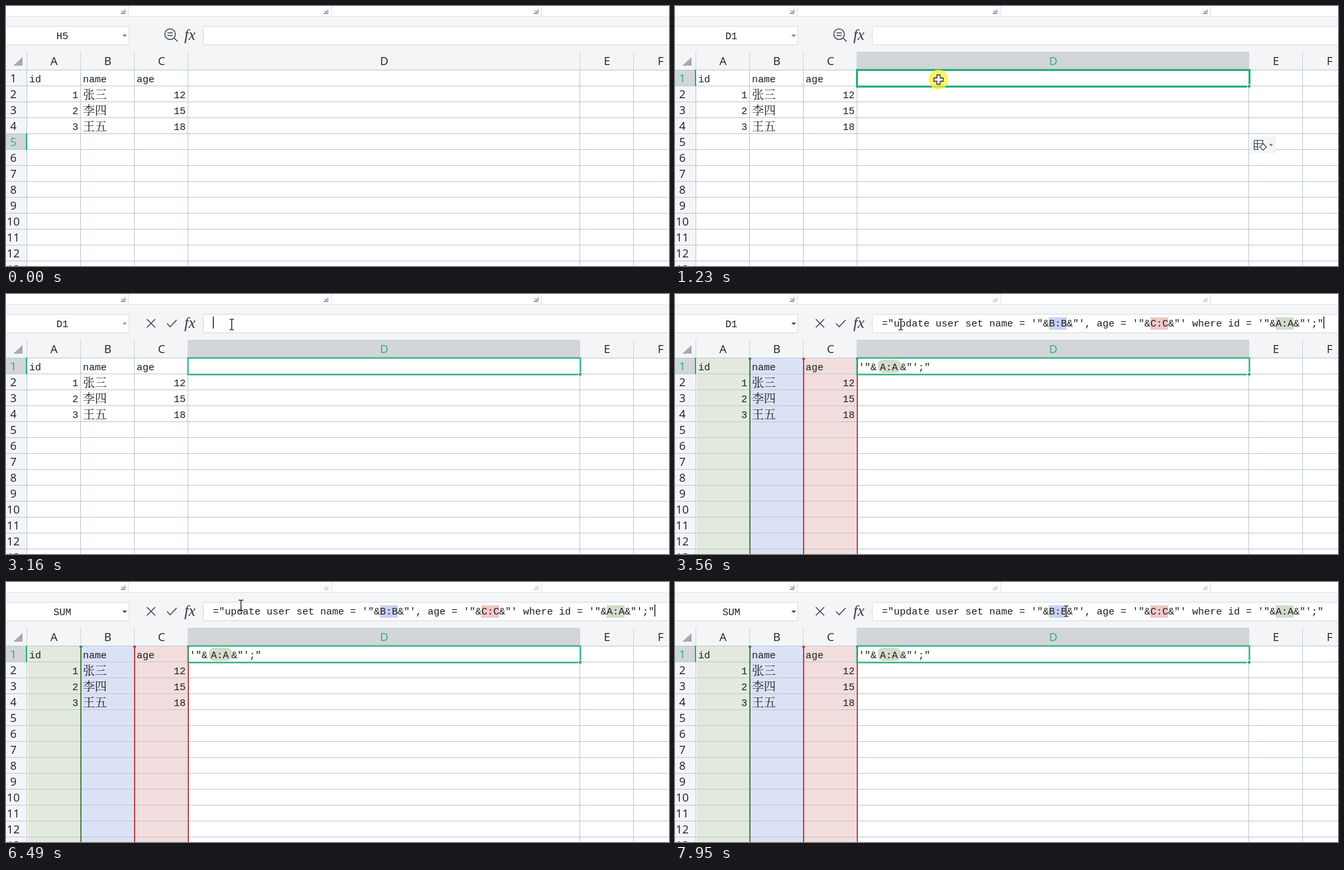
These frames come from a looping animation (1000x392 px, 8000 ms). An HTML page:

```html
<!DOCTYPE html>
<html lang="zh">
<head>
<meta charset="utf-8">
<title>Spreadsheet formula</title>
<style>
html, body { margin: 0; width: 100%; height: 100%; overflow: hidden; background: #fff; }
svg { display: block; width: 100vw; height: 100vh; }
text { white-space: pre; }
.mono { font: 15px "Liberation Mono", "Noto Serif CJK SC", "Noto Sans CJK SC", "Noto Sans CJK JP", "Noto Sans CJK", monospace; fill: #1c1c1c; }
.head { font: 17px "Open Sans", "Noto Sans", sans-serif; fill: #1c1c1c; text-anchor: middle; }
.end { text-anchor: end; }
.mid { text-anchor: middle; }
.icon { fill: none; stroke: #454a50; stroke-width: 1.5; }
</style>
</head>
<body>
<svg id="stage" viewBox="0 0 1000 392" preserveAspectRatio="none"></svg>
<script>
const LOOP = 8000, GREEN = '#22b078', GRID = '#bcc7da', ROW = 24, TOP = 96;
const COLS = [31, 112, 193, 274, 865, 946, 1027];
const stage = document.getElementById('stage');

const rect = (x, y, w, h, fill, more = '') =>
  `<rect x="${x}" y="${y}" width="${w}" height="${h}" fill="${fill}" ${more}/>`;
const text = (x, y, s, cls = 'mono', more = '') => `<text x="${x}" y="${y}" class="${cls}" ${more}>${s}</text>`;
const group = (id, body) => `<g id="${id}">${body}</g>`;
const rowTop = r => TOP + (r - 1) * ROW;

function ribbon() {
  const corner = (x, id) =>
    `<path id="${id}" d="M${x - 3} 11.5H${x + 3.5}V5M${x - 2} 6.5l3.5 3.5M${x + 1.5} 7v3h-3" fill="none" stroke="#777c84"/>`;
  return rect(0, 0, 1000, 392, '#f4f5f7') + rect(0, 0, 1000, 15, '#fff') + rect(0, 15, 1000, 1, '#e2e4e8') +
    [184, 491, 807].map(x => rect(x, 0, 1, 15, '#dfe1e5')).join('') +
    corner(176, 'c0') + corner(482, 'c1') + corner(799, 'c2');
}

function formulaBar() {
  const box = 'rx="2" stroke="#d8dade"';
  const search = '<circle cx="247.5" cy="42.5" r="8"/><path d="M253.5 48.5l5.5 5M243.5 40.5h8M243.5 44.5h8"/>';
  return rect(-4.5, 30.5, 190, 28, '#fff', box) + rect(297.5, 30.5, 720, 28, '#fff', box) +
    text(85, 50, '', 'mono mid', 'id="cellName"') +
    '<path id="drop" d="M175.5 43h7l-3.5 4z"/>' +
    `<g id="search" class="icon">${search}</g>` +
    '<path id="confirm" class="icon" d="M212.5 38l12.5 12.5M225 38l-12.5 12.5M243 44.5l4.5 5 10-10.5"/>' +
    text(269, 51, 'fx', '', 'font-family="Liberation Serif, serif" font-style="italic" font-size="23" fill="#33373c"');
}

function headers() {
  let out = rect(0, 69, 1000, 27, '#f4f5f7') + '<path d="M25 77v13H11z" fill="#a6a9af"/>' +
    rect(0, 0, 32, 24, '#d2d5da', 'id="rowMark"') + rect(275, 69, 591, 27, '#d2d5da', 'id="colMark"');
  for (const x of COLS) out += rect(x, 69, 1, 27, '#cfd3da');
  [...'ABCDEF'].forEach((c, i) => out += text((COLS[i] + COLS[i + 1]) / 2 + 1, 89, c, 'head', `id="col${c}"`));
  for (let r = 1; r < 14; r++) out += text(11, rowTop(r) + 19, r, 'head', `id="row${r}"`);
  return out;
}

function grid() {
  let out = '';
  for (const x of COLS) out += rect(x, TOP, 1, 300, GRID);
  for (let r = 1; r < 14; r++) out += rect(0, rowTop(r), 1000, 1, GRID);
  return out + rect(30, 0, 2, 25, GREEN, 'id="rowEdge"');
}

function cells() {
  const people = [['张三', 12], ['李四', 15], ['王五', 18]];
  return ['id', 'name', 'age'].map((s, i) => text(COLS[i] + 4, 115, s)).join('') +
    people.map(([name, age], i) => {
      const y = rowTop(i + 2) + 19;
      return text(109, y, i + 1, 'mono end') + text(116, y + 1, name, 'mono', 'style="font-size:18px"') +
        text(271, y, age, 'mono end');
    }).join('');
}

const tints = () => ['#e2eadd', '#dce2f6', '#f2dddc']
  .map((c, i) => rect(COLS[i] + 2, 97, 80, 295, c)).join('');

function rangeEdges() {
  return rect(32, 97, 1, 295, '#fff') + ['#55804f', '#bb4546', '#c04c4a'].map((c, i) =>
    rect(COLS[i + 1], 97, 2, 295, c) + rect(COLS[i + 1] - 1, 96, 4, 3, c)).join('');
}

function formula() {
  const parts = ['="update user set name = \'"&amp;', 'B:B', '&amp;"\', age = \'"&amp;', 'C:C',
    '&amp;"\' where id = \'"&amp;', 'A:A', '&amp;"\';"'];
  const marks = [[564, '#c8d2f5'], [717, '#f1c8c7'], [906, '#d2dcca']];
  return marks.map(([x, c]) => rect(x, 35, 27, 19, c)).join('') + text(312, 49, parts.join('')) +
    rect(276, 98, 588, 21, '#fff') + rect(306, 99, 35, 20, '#d2dcca', 'rx="8"') +
    text(277, 115, '\'"&amp;') + text(309, 115, 'A:A') + text(340, 115, '&amp;"\';"');
}

const selection = () => rect(274.5, 96.5, 592, 25, 'none', `id="border" stroke="${GREEN}"`) +
  rect(863.5, 118.5, 5, 5, GREEN, 'stroke="#fff"');

const pasteIcon = () => rect(868, 197, 38, 25, '#f4f5f7') +
  '<path class="icon" style="stroke-width:1.2" d="M873.5 202.5h13v5M873.5 202.5v14h7M873.5 207.5h13M873.5 212.5h7M878.5 202.5v14M887 207.5l5 5-5 5-5-5z"/>' +
  '<path d="M896 208h6l-3 3.5z" fill="#7a7f86"/>';

function pointer() {
  const beam = 'M-3.5 -8h2.5l1 1 1 -1h2.5M0 -7v14M-3.5 8h2.5l1 -1 1 1h2.5';
  return '<circle id="halo" r="15" fill="#ffed3b" fill-opacity=".75"/>' +
    '<path id="cross" d="M-2.5 -7h5v4.5h4.5v5h-4.5v4.5h-5v-4.5h-4.5v-5h4.5z" fill="#fff" stroke="#333" stroke-width="1.3"/>' +
    `<g id="beam" fill="none"><path d="${beam}" stroke="#fff" stroke-width="2.5" opacity=".7"/><path d="${beam}" stroke="#111" stroke-width="1.2"/></g>` +
    '<path id="arrow" d="M0 0v16l4 -3.5 2.5 5.5 2.5 -1 -2.5 -5.5h5z" fill="#fff" stroke="#222"/>';
}

stage.innerHTML = ribbon() + formulaBar() + headers() + rect(32, 97, 968, 295, '#fff') +
  group('tints', tints()) + grid() + cells() + group('edges', rangeEdges()) + group('formula', formula()) +
  group('selection', selection()) + group('paste', pasteIcon()) +
  rect(312, 34, 1.3, 18, '#111', 'id="caret"') + group('pointer', pointer());

const el = {};
stage.querySelectorAll('[id]').forEach(n => el[n.id] = n);
const show = (id, on) => el[id].setAttribute('visibility', on ? 'inherit' : 'hidden');
const set = (id, name, value) => el[id].setAttribute(name, value);

// Pointer path: time, x, y. Positions refresh every 70 ms.
const PATH = [[400, 897, 355], [1100, 397.5, 111], [1380, 397.5, 111], [2010, 340.5, 44], [2479, 340.5, 44],
  [2480, 340.5, 46], [6420, 340.5, 46], [6700, 396, 3], [6980, 499.5, 54.5], [7250, 541.5, 46], [7950, 590, 44]];

function pointerAt(t) {
  const i = PATH.findIndex(p => p[0] > t);
  if (i < 0) return PATH[PATH.length - 1].slice(1);
  const [t0, x0, y0] = PATH[i - 1], [t1, x1, y1] = PATH[i];
  const k = Math.floor((t - t0) / 70 + 1e-6) * 70 / (t1 - t0);
  return [x0 + (x1 - x0) * k, y0 + (y1 - y0) * k];
}

const within = (t, ...spans) => spans.some(([a, b]) => t >= a && t < b);

function draw(t) {
  const selected = t >= 1230, editing = t >= 2080, filled = t >= 3560;
  el.cellName.textContent = t >= 3690 ? 'SUM' : selected ? 'D1' : 'H5';
  set('drop', 'fill', filled ? '#4b5056' : editing ? '#9a9da2' : '#6f9485');
  show('search', !editing);
  show('confirm', editing);
  ['c1', 'c2'].forEach(id => set(id, 'opacity', filled ? 0.45 : 1));

  const y = rowTop(selected ? 1 : 5);
  set('rowMark', 'y', y);
  set('rowEdge', 'y', y);
  el.row5.style.fill = selected ? '' : GREEN;
  el.row1.style.fill = el.colD.style.fill = selected ? GREEN : '';
  show('colMark', selected);
  show('selection', selected);
  set('border', 'stroke-width', editing ? 2 : 3);
  show('paste', selected && !editing);
  ['tints', 'edges', 'formula'].forEach(id => show(id, filled));

  show('caret', within(t, [2080, 2610], [3160, 3690], [4220, 4750], [5230, 5760], [6290, 6840], [7390, 7880]));
  set('caret', 'x', filled ? 978 : 312);

  show('pointer', t >= 400);
  if (t < 400) return;
  const [px, py] = pointerAt(t);
  const shape = py > 96 ? 'cross' : py > 30 && py < 60 && px > 297 ? 'beam' : 'arrow';
  ['cross', 'beam', 'arrow'].forEach(id => show(id, id === shape));
  show('halo', within(t, [1230, 1300], [2010, 2210]));
  set('pointer', 'transform', `translate(${px.toFixed(1)} ${py.toFixed(1)})`);
}

const start = performance.now();
function tick() {
  draw((performance.now() - start) % LOOP);
  requestAnimationFrame(tick);
}
draw(0);
requestAnimationFrame(tick);
</script>
</body>
</html>
```
